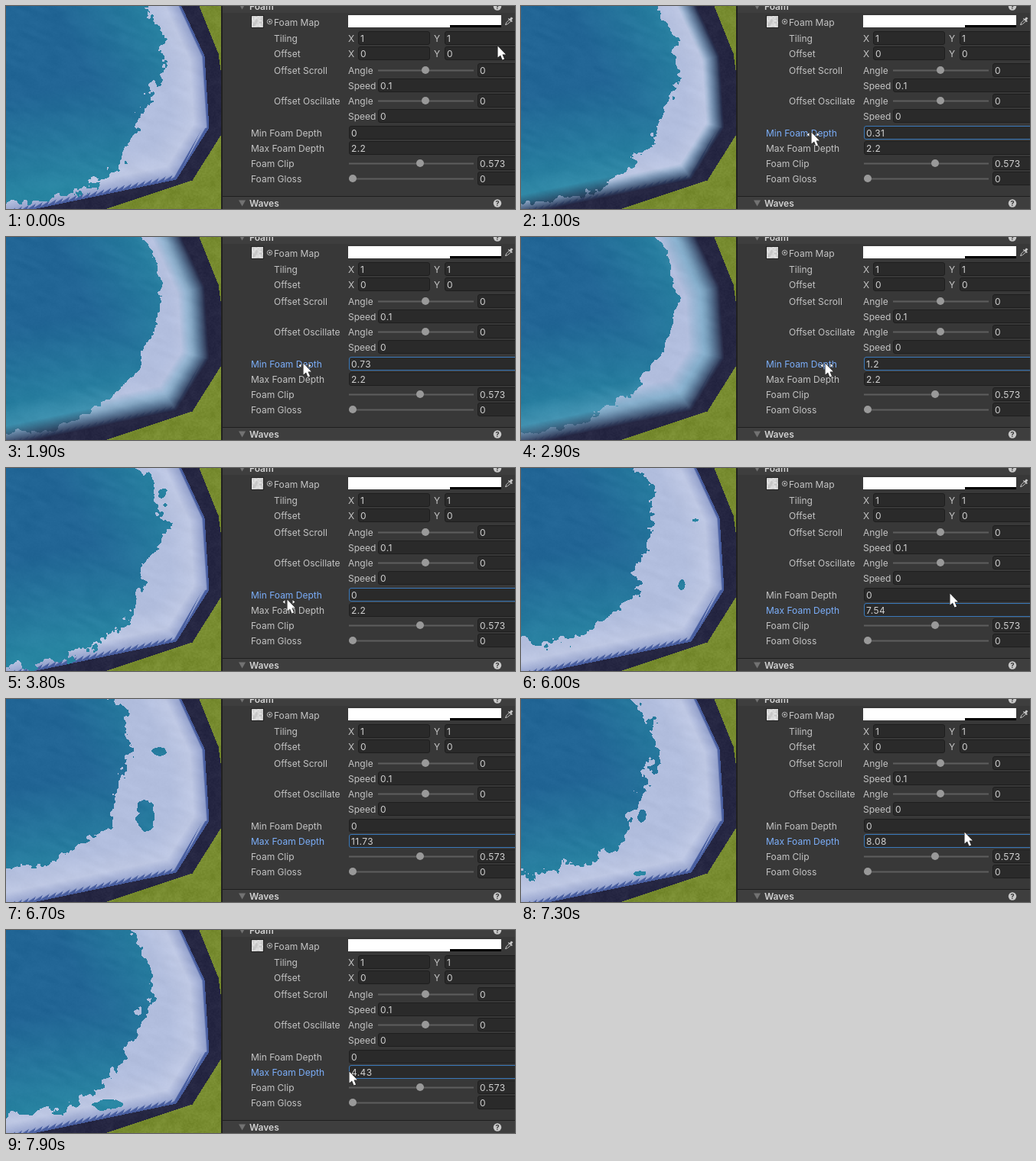
Animation of 665 by 266 pixels, one loop 8000 ms. Source, as an HTML page with a canvas:

```html
<!DOCTYPE html>
<html lang="en">
<head>
<meta charset="utf-8">
<title>Foam depth</title>
<style>
  html, body { margin: 0; width: 665px; height: 266px; overflow: hidden; background: #383838; }
  canvas { display: block; }
</style>
</head>
<body>
<canvas id="stage" width="665" height="266"></canvas>
<script>
const ctx = document.getElementById('stage').getContext('2d');
const W = 281, H = 266, LOOP = 8000, STEP = 100;
const clamp = (v, lo = 0, hi = 1) => Math.min(hi, Math.max(lo, v));
const mix = (a, b, k) => a + (b - a) * k;

// Linear interpolation over rows of [time, ...values]
function track(keys, t) {
  let i = 0;
  while (i < keys.length - 2 && t >= keys[i + 1][0]) i++;
  const a = keys[i], b = keys[i + 1], k = clamp((t - a[0]) / (b[0] - a[0]));
  return a.slice(1).map((v, j) => mix(v, b[j + 1], k));
}

// The two dragged values and the pointer that drags them
const MIN = [[700, 0], [1000, .31], [2900, 1.2], [3300, 0]];
const MAX = [[4200, 2.2], [4700, 2.68], [6000, 7.54], [6700, 11.73], [7900, 4.43]];
const POINTER = [[0, 642, 52], [500, 363, 167], [700, 364, 166], [1000, 379, 165], [2900, 397, 165], [3300, 363, 166],
  [3700, 363, 166], [4000, 376, 185], [4200, 376, 185], [4700, 394, 185], [6000, 560, 164], [6700, 710, 162], [7900, 448, 185]];

// ---- noise ----
let seed = 11;
const rand = () => (seed = (seed * 16807) % 2147483647) / 2147483647;
const lattice = Float32Array.from({ length: 4096 }, () => rand() * 2 - 1);
function noise(x, y) {
  const ix = Math.floor(x), iy = Math.floor(y);
  let u = x - ix, v = y - iy;
  u *= u * (3 - 2 * u);
  v *= v * (3 - 2 * v);
  const x0 = ix & 63, x1 = (ix + 1) & 63, y0 = (iy & 63) << 6, y1 = ((iy + 1) & 63) << 6;
  return mix(mix(lattice[y0 + x0], lattice[y0 + x1], u), mix(lattice[y1 + x0], lattice[y1 + x1], u), v);
}

// ---- shore ----
// Distance to a convex outline, positive on the water side
function inset(line, x, y) {
  let d = 1e9;
  for (let i = 0; i < line.length - 2; i += 2) {
    const dx = line[i + 2] - line[i], dy = line[i + 3] - line[i + 1];
    d = Math.min(d, ((y - line[i + 1]) * dx - (x - line[i]) * dy) / Math.hypot(dx, dy));
  }
  return d;
}
const WATERLINE = [229, 0, 259, 65, 265, 159, 222, 227, 35, 266];
const GRASSLINE = [252, 0, 277, 62, 282, 98, 282, 166, 243, 228, 128, 266];

const cells = [];
for (let y = 0; y < H; y++) for (let x = 0; x < W; x++) cells.push({
  x, y,
  r: Math.hypot(x, y),
  turn: Math.atan2(y, x) / Math.PI * 2,
  d: inset(WATERLINE, x, y),
  grass: inset(GRASSLINE, x, y) < 0,
  grain: noise(x / 1.7, y / 1.7) * .6 + noise(x / 9, y / 9) * .6,
  tooth: y > 159 ? 2 + ((x + y * .5) % 8) * .6 : 3
});

// Open water radius around the top left corner; turn runs from 0 (top) to 1 (left)
function reach(turn, min, max) {
  const bay = 14 * Math.exp(-(((turn - .4) / .12) ** 2)) / (1 + 4 * min);
  return 260 - 78 * (1 - turn) ** 2.6 - bay - 24.5 * Math.log(max / 2.2) - 4 * min;
}

// Drifting gaps in the foam: x, y, rx, ry, time of full size
const GAPS = [[181, 152, 12, 18, 6700], [199, 68, 10, 5, 6700], [130, 228, 19, 7, 7900]];

const image = ctx.createImageData(W, H);
const GRASS = [119, 139, 47], ROCK = [37, 38, 66], DEEP = [33, 101, 149], TEAL = [41, 134, 163],
  SHALLOW = [92, 160, 192], FOAM_IN = [178, 190, 222], FOAM_OUT = [198, 206, 231], EDGE = [136, 151, 198], RIM = [72, 94, 160];

function shade(c, min, max, flow, gaps) {
  const { x, y, d, grain } = c;
  if (c.grass) return GRASS.map(v => v + grain * 9);
  if (d <= 0) return ROCK.map(v => v + grain * 6);
  const sx = x + flow * .04;
  const streak = noise((x + y * .5 + flow * .01) / 26, (y - x * .4) / 7) * 3 + grain * 2;
  const rough = noise(sx / 15, y / 15) * .8 + noise(sx / 6 + 20, y / 6) * .5 + noise(sx / 2.4, y / 2.4 + 30) * .2;
  const foamy = c.r + rough * 13 / (1 + min) > reach(c.turn, min, max)
    && !gaps.some(g => ((x - g.x) / g.rx) ** 2 + ((y - g.y) / g.ry) ** 2 + rough * .8 < 1);

  const near = clamp(1 - (d - 20) / 130), bank = clamp(1 - d / 55) * clamp(min);
  const sink = mix(1, clamp(d / 26), clamp(min * 5));
  const cover = !foamy ? 0 : min > 0 ? clamp(d / (42 * Math.sqrt(min))) : 1;
  const bright = clamp(1 - d / 50), dim = clamp(1 - d / 20), rim = clamp((c.tooth - d) / 2 + .5);
  return DEEP.map((v, k) => {
    const water = mix(ROCK[k], mix(mix(v, TEAL[k], near), SHALLOW[k], bank), sink) + streak;
    const foam = mix(mix(FOAM_IN[k], FOAM_OUT[k], bright), EDGE[k], dim) + streak;
    return mix(water, mix(foam, RIM[k], rim), cover);
  });
}

function drawSea(t) {
  const [min] = track(MIN, t), [max] = track(MAX, t);
  // The water only moves while the editor is being used
  const flow = clamp(t, 600, 3400) + clamp(t, 3700, 4000) + clamp(t, 4100, LOOP);
  const gaps = GAPS.map(([x, y, rx, ry, at]) => {
    const s = 1 - Math.abs(t - at) / 1100;
    return { x: x - (t - at) * .04, y, rx: rx * s, ry: ry * s, s };
  }).filter(g => g.s > 0);
  cells.forEach((c, i) => image.data.set([...shade(c, min, max, flow, gaps), 255], i * 4));
  ctx.putImageData(image, 0, 0);
}

// ---- inspector ----
const rect = (x, y, w, h, fill) => { ctx.fillStyle = fill; ctx.fillRect(x, y, w, h); };
function text(s, x, mid, color = '#c4c4c4', weight = 400, spacing = 0) {
  ctx.font = `${weight} 12px Inter, sans-serif`;
  ctx.letterSpacing = spacing + 'px';
  ctx.fillStyle = color;
  ctx.fillText(s, x, mid + 4.5);
}
function shape(points, fill, stroke) {
  ctx.beginPath();
  points.forEach(([x, y]) => ctx.lineTo(x, y));
  ctx.closePath();
  if (stroke) { ctx.strokeStyle = stroke; ctx.lineWidth = 1; ctx.stroke(); }
  ctx.fillStyle = fill;
  ctx.fill();
}
function disc(x, y, r, fill) {
  ctx.beginPath();
  ctx.arc(x, y, r, 0, 7);
  ctx.fillStyle = fill;
  ctx.fill();
}
function field(x, mid, value, right = 670, focus = false) {
  const top = Math.round(mid - 9.5);
  ctx.beginPath();
  ctx.roundRect(x + .5, top + .5, right - x - 1, 17, 2.5);
  ctx.fillStyle = '#2a2a2a';
  ctx.fill();
  ctx.strokeStyle = focus ? '#3a79bb' : '#1e1e1e';
  ctx.lineWidth = 1;
  ctx.stroke();
  text(value, x + 3, mid, '#d2d2d2', 400, .4);
}
function slider(x, mid, thumb, value) {
  rect(x, mid - 1, 611 - x, 2, '#5e5e5e');
  disc(thumb, mid - .5, 5, '#999');
  field(616, mid, value);
}
function header(title, top, mid) {
  rect(283, top, 382, 18, '#3e3e3e');
  rect(283, top - 1, 382, 1, '#1f1f1f');
  shape([[304, mid - 4], [313, mid - 4], [308.5, mid + 4]], '#727272');
  text(title, 318, mid, '#d2d2d2', 600);
  disc(642, mid, 5.2, '#c8c8c8');
  ctx.font = '700 9px Inter, sans-serif';
  ctx.fillStyle = '#333';
  ctx.fillText('?', 639.6, mid + 3.4);
}
function drawFoamMap() {
  rect(320, 12, 17, 17, '#222');
  for (let y = 0; y < 15; y++) for (let x = 0; x < 15; x++) {
    const v = 212 + noise(x / 2, y / 2) * 20 | 0;
    rect(321 + x, 13 + y, 1, 1, `rgb(${v},${v},${v})`);
  }
  ctx.strokeStyle = '#b8b8b8';
  ctx.lineWidth = 1;
  ctx.beginPath();
  ctx.arc(344.5, 20.5, 3.2, 0, 7);
  ctx.stroke();
  disc(344.5, 20.5, 1.2, '#c4c4c4');
  text('Foam Map', 350, 21.5);
  rect(447, 12, 200, 16, '#fff');
  rect(580, 25, 67, 3, '#000');
  ctx.strokeStyle = '#c4c4c4';
  ctx.beginPath();
  ctx.moveTo(652.5, 25);
  ctx.lineTo(653.5, 22);
  ctx.lineTo(658, 17.5);
  ctx.moveTo(653, 24.5);
  ctx.lineTo(655.5, 23.5);
  ctx.lineTo(660, 19.5);
  ctx.stroke();
  shape([[656, 16], [658, 17], [660, 14.5], [662.5, 16], [660.5, 18.5], [662, 20], [660.5, 21], [656, 17]], '#c4c4c4');
}
function drawPanel(t) {
  const format = v => String(+v.toFixed(2));
  const focus = t < 700 ? '' : t < 4200 ? 'Min' : 'Max';
  rect(281, 0, 384, H, '#383838');
  rect(281, 0, 2, H, '#202020');
  header('Foam', -9, .5);
  header('Waves', 250, 258.5);
  drawFoamMap();
  [['Tiling', 42.5, '1'], ['Offset', 62.5, '0']].forEach(([label, mid, value]) => {
    text(label, 350, mid);
    text('X', 447, mid);
    field(460, mid, value, 554);
    text('Y', 559, mid);
    field(573, mid, value);
  });
  [['Offset Scroll', 84.5, '0.1'], ['Offset Oscillate', 124.5, '0']].forEach(([label, mid, speed]) => {
    text(label, 350, mid);
    text('Angle', 447, mid);
    slider(486, mid, 548, '0');
    text('Speed', 447, mid + 20);
    field(486, mid + 20, speed);
  });
  [['Min', 166.5, MIN], ['Max', 186.5, MAX]].forEach(([name, mid, keys]) => {
    const on = focus === name;
    text(name + ' Foam Depth', 320, mid, on ? '#7baefa' : '#c4c4c4');
    field(448, mid, format(track(keys, t)[0]), 670, on);
  });
  text('Foam Clip', 320, 206.5);
  slider(448, 206.5, 541, '0.573');
  text('Foam Gloss', 320, 226.5);
  slider(448, 226.5, 453, '0');
}

function drawPointer(t) {
  const [px, py] = track(POINTER, t).map(Math.round);
  ctx.save();
  ctx.translate(px + .5, py + .5);
  shape([[0, 0], [0, 15], [3.5, 12], [6, 18], [8.6, 17], [6, 11], [10.5, 11]], '#fff', '#111');
  if (px < 446 && py > 156) {
    shape([[-6, 3], [-3, .5], [-3, 5.5]], '#fff', '#111');
    shape([[10, 3], [7, .5], [7, 5.5]], '#fff', '#111');
  }
  ctx.restore();
}

let shown = -1;
function tick(now) {
  const t = Math.floor((now % LOOP) / STEP) * STEP;
  if (t !== shown) {
    shown = t;
    drawSea(t);
    drawPanel(t);
    drawPointer(t);
  }
  requestAnimationFrame(tick);
}
tick(0);
</script>
</body>
</html>
```
